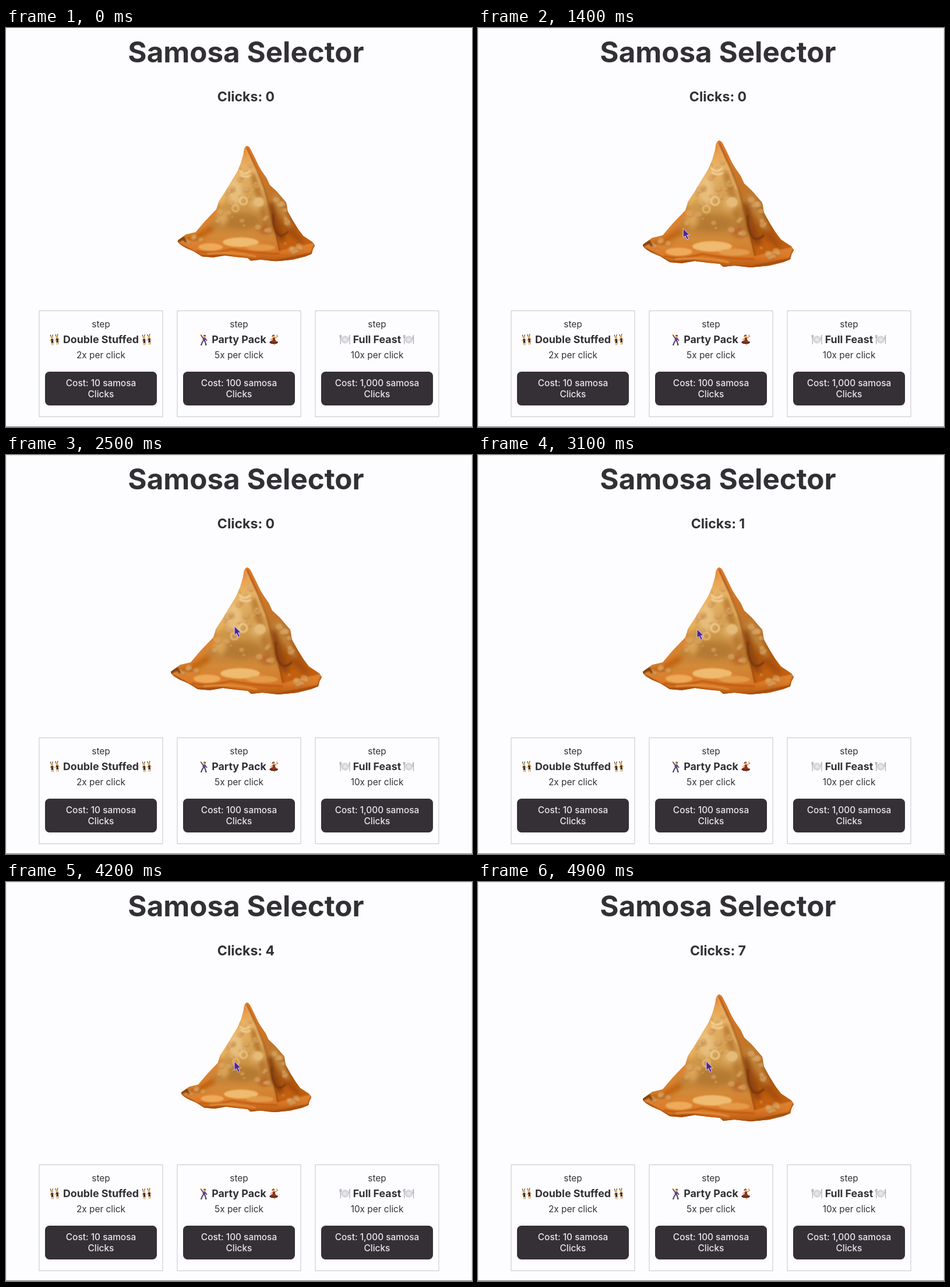
An HTML page that plays this animation: 800 px wide and 685 px high, repeating every 5 s.

```html
<!DOCTYPE html>
<html lang="en">
<head>
<meta charset="utf-8">
<title>Samosa Selector</title>
<style>
  html, body { margin: 0; width: 100%; height: 100%; overflow: hidden; background: #fdfcff; }
  svg { display: block; width: 100vw; height: 100vh; }
  text { font-family: Inter, "Liberation Sans", sans-serif; font-optical-sizing: none; text-anchor: middle; fill: #323035; }
  .title { font-size: 49.3px; font-weight: 700; }
  .count { font-size: 23.1px; font-weight: 700; }
  .name { font-size: 17.85px; font-weight: 700; }
  .body { font-size: 15.4px; }
  .cost { font-size: 15.4px; font-weight: 500; fill: #e9e6ec; }
</style>
</head>
<body>
<svg viewBox="0 0 800 685" preserveAspectRatio="none">
  <defs>
    <linearGradient id="front" x1="0" y1="0" x2="0" y2="1">
      <stop offset="0" stop-color="#e0782c"/>
      <stop offset=".1" stop-color="#e8a250"/>
      <stop offset=".22" stop-color="#e6b56a"/>
      <stop offset=".5" stop-color="#d09a4b"/>
      <stop offset=".68" stop-color="#c08238"/>
      <stop offset=".78" stop-color="#d38a38"/>
      <stop offset="1" stop-color="#cf6a1c"/>
    </linearGradient>
    <linearGradient id="side" gradientUnits="userSpaceOnUse" x1="415" y1="195" x2="500" y2="410">
      <stop offset="0" stop-color="#e27a2b"/>
      <stop offset=".3" stop-color="#cb7527"/>
      <stop offset=".5" stop-color="#b9762c"/>
      <stop offset=".7" stop-color="#a5520f"/>
      <stop offset=".85" stop-color="#c4600f"/>
      <stop offset="1" stop-color="#b95c14"/>
    </linearGradient>
    <linearGradient id="flap" x1="0" y1="0" x2="0" y2="1">
      <stop offset="0" stop-color="#d98a3a"/>
      <stop offset=".5" stop-color="#dc7a28"/>
      <stop offset="1" stop-color="#b0520d"/>
    </linearGradient>
    <filter id="soft" x="-30%" y="-30%" width="160%" height="160%"><feGaussianBlur stdDeviation="4"/></filter>
    <filter id="fuzz" x="-30%" y="-30%" width="160%" height="160%"><feGaussianBlur stdDeviation="1.1"/></filter>
    <clipPath id="hull"><path id="hullPath"/></clipPath>

    <g id="dancer">
      <path d="M-1.5-6-2-9M1.2-6 2-9" stroke="#2d2a30" stroke-width="1.1"/>
      <circle cy="-4.4" r="2.2" fill="#e9a548"/>
      <path d="M-1.6-1-3.2 2M1.6-1 3.2 2M-1 4-1.2 9M1.2 4 1.2 9" stroke="#e59a45" stroke-width="1.4"/>
      <path d="M-2-1.8H2L1.4 1.5 2 5H-2L-1.4 1.5Z" fill="#2d2a30"/>
    </g>
    <g id="pair">
      <use href="#dancer" x="-4.4" transform="rotate(-6)"/>
      <use href="#dancer" x="4.4" transform="rotate(-6)"/>
    </g>
    <g id="man" transform="scale(-1 1)">
      <path d="M2-3 5.5-8M-2-2-5 2" stroke="#5d4580" stroke-width="2"/>
      <circle cx="5.7" cy="-8.2" r="1.1" fill="#e9a548"/>
      <circle cx="-1" cy="-6" r="2.3" fill="#e9a548"/>
      <path d="M-3.5-6Q-2-10 1.3-7L-2-6.5Z" fill="#4a2d1d"/>
      <path d="M-2.7-3.4H2.6L2 2.4H-2Z" fill="#5d4580"/>
      <path d="M-1.2 2-3.4 8.6M1.2 2 3 4.5 4.6 8.6" stroke="#4d3a70" stroke-width="2"/>
      <path d="M-4.5 9H-2M3.8 9H6" stroke="#2d2a30" stroke-width="1.4"/>
    </g>
    <g id="woman" transform="scale(-1 1)">
      <path d="M-1-3-6-5.5-4-8.5M2-2 6.5 0" stroke="#e59a45" stroke-width="1.6"/>
      <circle cx="1" cy="-6" r="2.3" fill="#e9a548"/>
      <path d="M-1-7Q1-10 3.6-7L4-4 2-7Z" fill="#4a2d1d"/>
      <path d="M-1.6-3.4H2.4L3 1Q8 2 8.3 5.5 3 8.5-3 7-7 6-6.5 3.5-3 3.5-1.6 0Z" fill="#8f3322"/>
      <path d="M-5.5 5Q0 7.5 7.5 5" stroke="#3a2527" stroke-width="1.8"/>
      <path d="M0 7-1 9.5" stroke="#e59a45" stroke-width="1.6"/>
    </g>
    <g id="plate">
      <circle r="6.1" fill="#d9d9de" stroke="#bdbdc4" stroke-width=".7"/>
      <circle r="3.9" fill="#e6e6ea" stroke="#c5c5cb" stroke-width=".6"/>
      <path d="M-7.7-8V8M8-8V8" stroke="#a9a9b1" stroke-width="1.2"/>
      <path d="M-9-8V-3.5Q-7.7-1.5-6.4-3.5V-8M8-8Q5.9-4 7.3 0" stroke="#a9a9b1" stroke-width=".9"/>
    </g>
  </defs>

  <rect width="800" height="685" fill="#fdfcff"/>
  <text class="title" x="412" y="59">Samosa Selector</text>
  <text class="count" x="412" y="126" id="count">Clicks: 0</text>
  <g id="samosa"></g>
  <g id="cards" fill="none"></g>
  <path id="edge" d="M.5 685V.5H799.5V685" fill="none" stroke="#e3e2e7"/>
  <path d="M0 684.5H800" stroke="#77757b"/>
  <path id="cursor" d="M0 0V15.2L3.6 12.2 6.6 18.6 9.4 17.3 6.5 11.1H11.2Z"
    fill="#4b2596" stroke="#d9cdf0" stroke-width="1" stroke-linejoin="round"/>
</svg>
<script>
const LOOP = 5000, STEP = 100;
const $ = id => document.getElementById(id);

// Upgrade cards: centre, icons with their offsets, and texts.
const cards = [
  { x: 163, name: 'Double Stuffed', rate: 2, cost: '10', icons: [['pair', -79.5], ['pair', 78.5]] },
  { x: 400, name: 'Party Pack', rate: 5, cost: '100', icons: [['man', -60], ['woman', 60.5]] },
  { x: 637, name: 'Full Feast', rate: 10, cost: '1,000', icons: [['plate', -55], ['plate', 54.5]] }
];
const label = (cls, x, y, s) => `<text class="${cls}" x="${x}" y="${y}">${s}</text>`;

$('cards').innerHTML = cards.map(({ x, name, rate, cost, icons }) =>
  `<rect x="${x - 106}" y="485.5" width="212" height="182" stroke="#c6c5ca"/>` +
  label('body', x, 514, 'step') +
  label('name', x, 541, name) +
  icons.map(([id, dx]) => `<g transform="translate(${x + dx} 535)"><use href="#${id}"/></g>`).join('') +
  label('body', x, 567, `${rate}x per click`) +
  `<rect x="${x - 96}" y="590" width="192" height="58" rx="7.5" fill="#352f36"/>` +
  label('cost', x, 615, `Cost: ${cost} samosa`) +
  label('cost', x, 634, 'Clicks')
).join('');

// Samosa, drawn at its hovered size.
const hull = 'M413 193Q408 195 407 208L402 226 396 241 385 259 373 279 360 299 356 313 334 336 ' +
  '317 356 299 360 284 371Q279 375 299 386L313 392 329 402 350 404 372 400 395 403 415 405 ' +
  '421 410 440 408 468 411 500 408 524 402 536 397 538 389 542 381 538 375 520 363 511 351 ' +
  '501 335 491 317 488 300 470 279 457 267 451 254 442 241 436 231 427 212 420 198Q417 193 413 193Z';

let seed = 11;
const rand = () => (seed = seed * 16807 % 2147483647) / 2147483647;

function bubbles(n, place) {
  let out = '';
  for (let i = 0; i < n; i++) {
    const [x, y] = place(rand(), rand());
    const r = 2 + rand() * 5;
    out += `<ellipse cx="${x + 1}" cy="${y + 1.6}" rx="${r * 1.1}" ry="${r}" fill="#a8672a" opacity=".35"/>` +
      `<ellipse cx="${x}" cy="${y}" rx="${r}" ry="${r * .85}" fill="#edc27e" opacity=".45"/>`;
  }
  return out;
}

const frontSpots = bubbles(32, (u, v) => {
  const y = 228 + v * 125, half = (y - 190) * .34;
  return [410 - (y - 228) * .06 + (u - .5) * 2 * half, y];
});
const sideSpots = bubbles(7, (u, v) => [464 + v * 24 + u * 12, 290 + v * 50]);
const flapSpots = bubbles(7, (u, v) => [486 + u * 46, 377 + v * 20]);
const leftSpots = bubbles(5, (u, v) => [294 + u * 40, 363 + v * 14]);

$('hullPath').setAttribute('d', hull);
$('samosa').innerHTML = `<g clip-path="url(#hull)" fill="none" stroke-linecap="round">
  <path d="${hull}" fill="url(#front)"/>
  <g filter="url(#soft)">
    <path d="M402 232 386 264 364 298" stroke="#edb55f" stroke-width="10"/>
    <path d="M357 315 335 338 314 360" stroke="#dc832d" stroke-width="14"/>
    <path d="M345 350 318 366 288 374" stroke="#c0600f" stroke-width="11"/>
    <path d="M426 250 440 300 452 350" stroke="#b5752c" stroke-width="10"/>
    <ellipse cx="402" cy="335" rx="36" ry="15" fill="#b0752e" opacity=".7"/>
    <ellipse cx="392" cy="280" rx="14" ry="24" fill="#edc788" opacity=".75"/>
    <ellipse cx="368" cy="328" rx="10" ry="14" fill="#e0ac5f" opacity=".8"/>
    <ellipse cx="432" cy="302" rx="13" ry="11" fill="#e0b06a" opacity=".8"/>
    <ellipse cx="448" cy="352" rx="11" ry="8" fill="#b85a20" opacity=".75"/>
  </g>
  <g filter="url(#fuzz)">${frontSpots}
    <ellipse cx="436" cy="299" rx="10" ry="9" fill="#e6ba77"/>
    <circle cx="407" cy="297" r="7" stroke="#f2d196" stroke-width="2.5"/>
    <circle cx="392" cy="311" r="6" stroke="#ecc584" stroke-width="2.2"/>
    <path d="M400 240Q408 250 419 241M402 248Q411 254 420 249" stroke="#f5d29a" stroke-width="3"/>
  </g>
  <path d="M413 192 421 215 434 240 447 272 458 312 466 350 478 415H560L500 300 422 190Z" fill="url(#side)"/>
  <g filter="url(#soft)">
    <path d="M460 305 468 345 480 368" stroke="#8a400a" stroke-width="10"/>
    <path d="M466 290 482 320 494 343" stroke="#c98f42" stroke-width="10" opacity=".85"/>
    <path d="M492 350 515 372" stroke="#a04c0c" stroke-width="10"/>
  </g>
  <g filter="url(#fuzz)">${sideSpots}
    <path d="M414 198 433 240 447 275 459 320 467 355 477 394" stroke="#994d14" stroke-width="2"/>
    <path d="M411 199 429 240 442 275" stroke="#efb062" stroke-width="2.5" opacity=".7"/>
    <path d="M463 322Q462 348 473 361 482 365 490 356" stroke="#74350f" stroke-width="3"/>
  </g>
  <path d="M280 374Q310 370 330 375 350 367 370 372 395 362 420 369 450 375 474 392L500 385 545 375V415H280Z"
    fill="url(#flap)" filter="url(#fuzz)"/>
  <g filter="url(#fuzz)">${leftSpots}${flapSpots}
    <ellipse cx="345" cy="384" rx="23" ry="7" fill="#eeaa58"/>
    <ellipse cx="402" cy="375" rx="34" ry="9" fill="#efbb70"/>
    <ellipse cx="440" cy="385" rx="27" ry="6" fill="#e39a48"/>
    <path d="M320 392Q350 398 385 388 425 396 474 397" stroke="#bd5c14" stroke-width="3"/>
    <path d="M340 397Q385 392 430 402" stroke="#e58f3a" stroke-width="3"/>
    <path d="M284 373 294 367 298 373" stroke="#7d3d10" stroke-width="4"/>
    <path d="M283 377 329 402 372 400 421 410 468 411 536 397 542 382" stroke="#a14c0c" stroke-width="4"/>
  </g>
</g>`;

// Pointer stops: time, x, y.
const stops = [[600, 268, 470], [700, 290, 428], [800, 317, 387], [1100, 326, 366], [2000, 427, 283],
  [2800, 376, 299], [3100, 376, 299], [3500, 392, 308]];
// Mouse button down and up times.
const presses = [[2900, 3100], [3300, 3500], [3700, 3800], [4000, 4100], [4200, 4300], [4500, 4600], [4800, 4900]];

function pointerAt(t) {
  const i = stops.findIndex(s => s[0] > t);
  if (i < 0) return stops[stops.length - 1].slice(1);
  const [t0, x0, y0] = stops[i - 1], [t1, x1, y1] = stops[i];
  let k = (t - t0) / (t1 - t0);
  if (t0 >= 1100) k = k * k * (3 - 2 * k);
  return [x0 + (x1 - x0) * k, y0 + (y1 - y0) * k];
}

function draw(t) {
  const down = presses.some(([a, b]) => t >= a && t < b);
  const scale = (down ? .95 : t >= 800 ? 1.1 : 1) / 1.1;
  $('samosa').setAttribute('transform', `translate(412 295) scale(${scale}) translate(-412 -295)`);
  $('count').textContent = 'Clicks: ' + presses.filter(p => t >= p[1]).length;
  $('edge').style.display = t >= 700 ? '' : 'none';
  const shown = t >= stops[0][0];
  $('cursor').style.display = shown ? '' : 'none';
  if (shown) $('cursor').setAttribute('transform', `translate(${pointerAt(t)})`);
}

const start = performance.now();
function tick() {
  const t = (performance.now() - start) % LOOP;
  draw(Math.floor(t / STEP) * STEP);
  requestAnimationFrame(tick);
}
tick();
</script>
</body>
</html>
```
